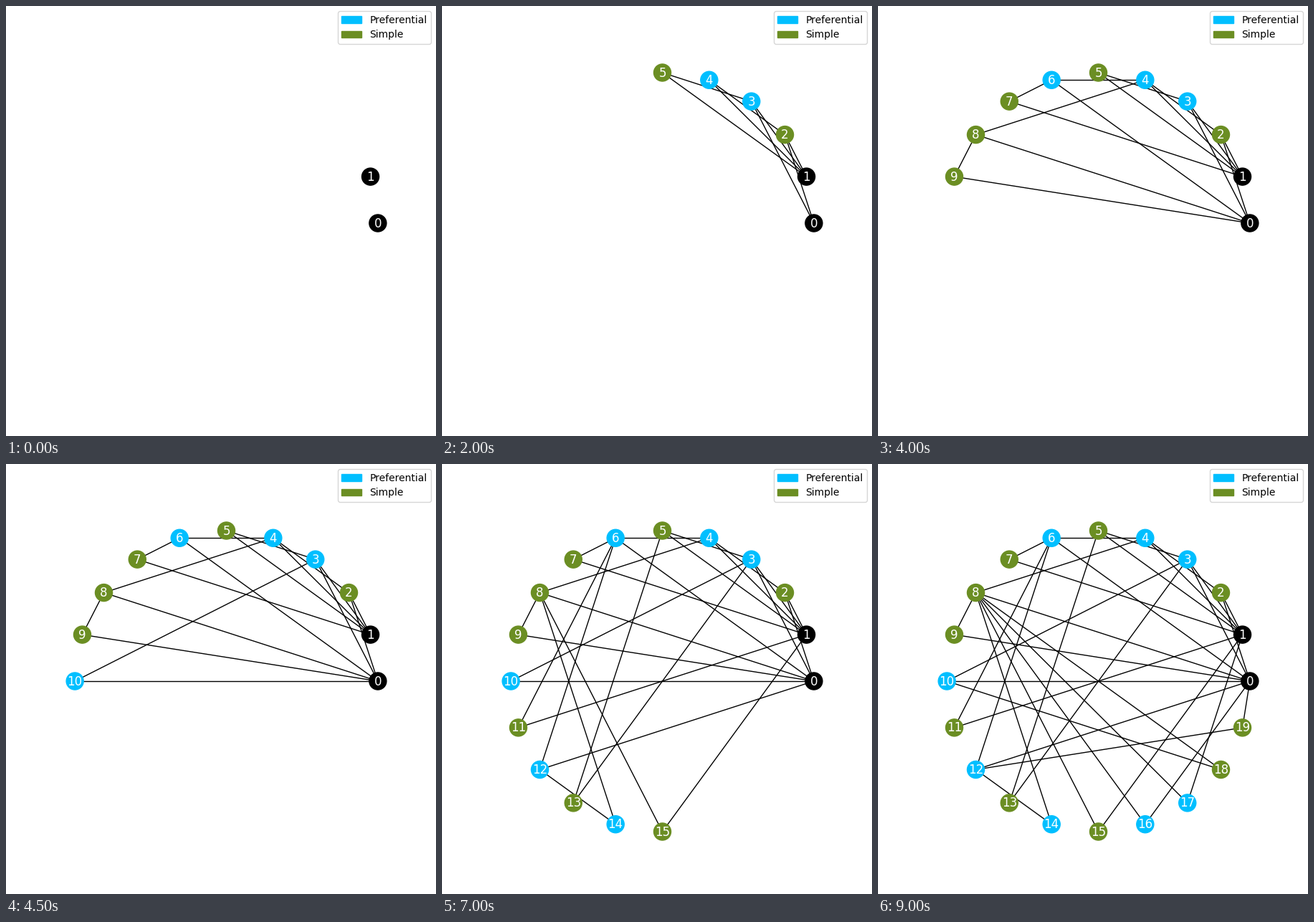
A matplotlib script that plays this animation: 600 px wide and 600 px high, repeating every 9500 ms.

```python
import numpy as np
import matplotlib.pyplot as plt
from matplotlib.animation import FuncAnimation
from matplotlib.collections import LineCollection
from matplotlib.patches import Patch

PREF, SIMPLE, SEED = "deepskyblue", "olivedrab", "black"
NODES, START = 20, 2
PREFERENTIAL = {3, 4, 6, *range(10, 17, 2), 17}

# Each hub with the later nodes that attach to it
HUBS = {
    0: [2, 3, 6, *range(8, 11), 12, 16, 19],
    1: [*range(2, 6), *range(7, 16, 4), 17],
    8: [9, *range(14, 19)],
    6: [7, 11, 12],
    3: [5, 10, 13],
    4: [6, 8],
    12: [14, 19],
    2: [4],
    5: [13],
    10: [18],
}


def node_color(i):
    if i < START:
        return SEED
    return PREF if i in PREFERENTIAL else SIMPLE


angle = 2 * np.pi * np.arange(NODES) / NODES
pos = np.round(np.column_stack([np.cos(angle), np.sin(angle)]), 9)
colors = [node_color(i) for i in range(NODES)]
links = [(hub, new) for hub, later in HUBS.items() for new in later]

fig, ax = plt.subplots(figsize=(6, 6), dpi=100)
ax.set(xlim=(-1.1, 1.1), ylim=(-1.1, 1.1))
ax.axis("off")

edges = ax.add_collection(
    LineCollection([], colors="black", linewidths=1, zorder=1), autolim=False)
nodes = ax.scatter(*pos.T, s=300, c=colors, zorder=2)
labels = [ax.annotate(str(i), xy, xytext=(0, -0.37), textcoords="offset points",
                      size=12, color="white", ha="center", va="center")
          for i, xy in enumerate(pos)]
fig.legend(handles=[Patch(color=PREF, label="Preferential"),
                    Patch(color=SIMPLE, label="Simple")],
           loc="upper right", borderaxespad=0.502)


def update(step):
    count = START + step
    edges.set_segments([pos[[hub, new]] for hub, new in links if new < count])
    nodes.set_offsets(pos[:count])
    nodes.set_facecolor(colors[:count])
    for i, label in enumerate(labels):
        label.set_visible(i < count)
    return [edges, nodes, *labels]


anim = FuncAnimation(fig, update, frames=NODES - START + 1, interval=500,
                     repeat=True, repeat_delay=0)
plt.show()
```
